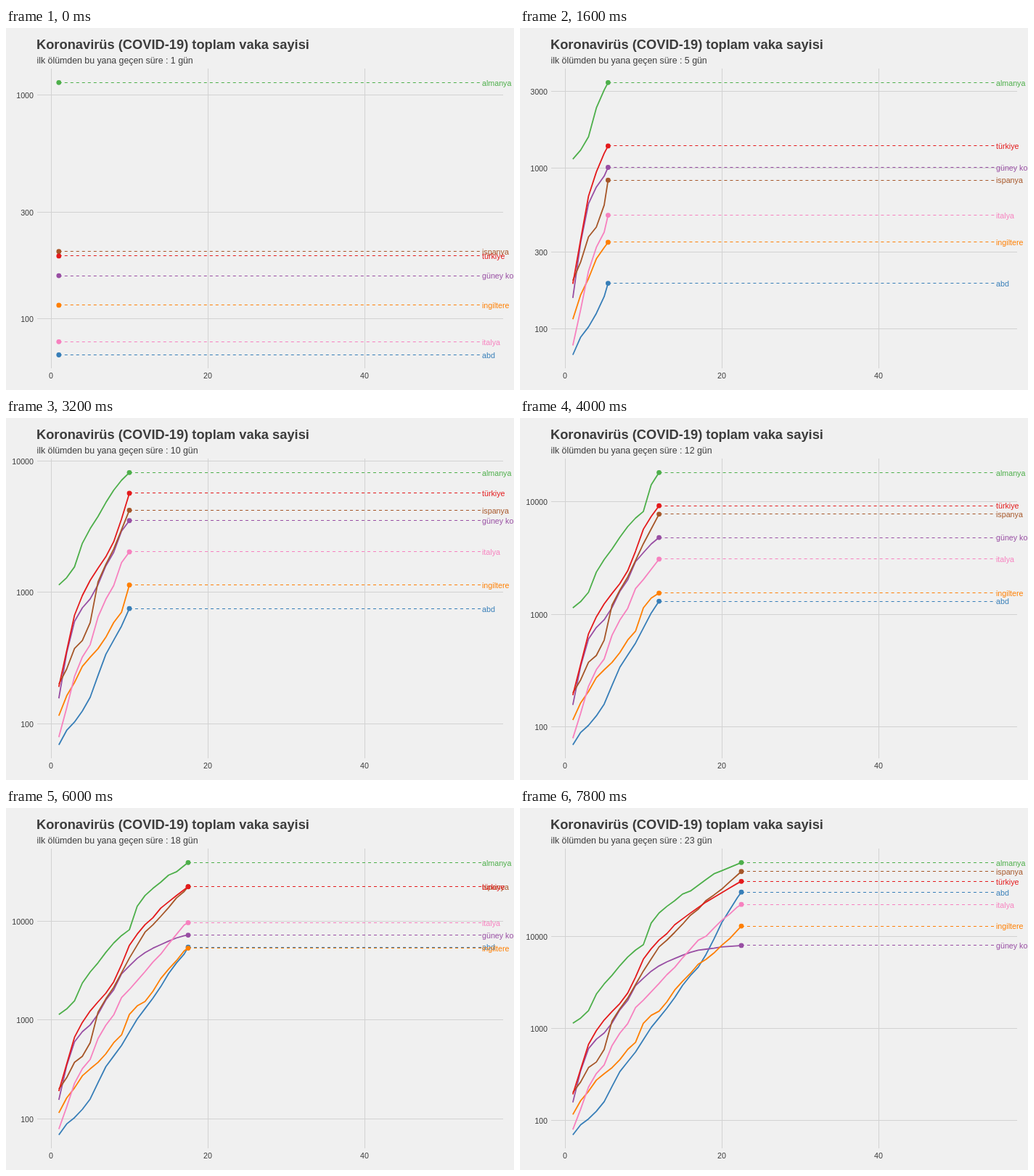
Animation of 700x500 px, one loop 8000 ms. Source, as an HTML page with a canvas:

```html
<!DOCTYPE html>
<html lang="tr">
<head>
<meta charset="utf-8">
<title>Koronavirüs (COVID-19) toplam vaka sayisi</title>
<style>
  html, body { margin: 0; width: 100%; height: 100%; overflow: hidden; background: #f0f0f0; }
  canvas { display: block; }
</style>
</head>
<body>
<canvas id="chart" width="700" height="500"></canvas>
<script>
const ctx = document.getElementById('chart').getContext('2d');
const FONT = '"Liberation Sans", Arial, sans-serif';
const INK = '#3c3c3c';
const STEP_MS = 200, STEPS = 40, STEPS_PER_DAY = 1.8;
const panel = { left: 43, right: 685, top: 56, bottom: 470 };
const yHigh = 75.3, yLow = 451.5;

// Daily totals; gaps are filled by the geometric mean of their neighbours.
const series = [
  ['abd', '#377eb8', [69, 89, 103, 125, 159, 233, 338, , 554, 754, 1025, , 1663, 2174, 2951, 3774, 4661, 6427, 9415, 14250, , 26747, 35206]],
  ['almanya', '#4daf4a', [1139, 1296, 1567, 2369, 3062, 3795, 4838, 6012, 7156, 8198, 14138, 18187, 21463, 24774, 29212, 31554, 36508, , 48582, 52547, , 61913, 67366]],
  ['güney kore', '#984ea3', [156, 346, 602, 763, 893, 1146, 1595, 2022, 2931, 3526, 4212, 4812, 5328, , 6284, 6767, 7134, , 7513, 7755, 7869, , 8086]],
  ['ingiltere', '#ff7f00', [115, 163, 206, 273, 321, 373, 456, 590, 707, 1140, 1391, 1543, 1950, 2626, 3269, 3983, 5018, 5683, 6650, 8077, 9529, , 14543]],
  ['ispanya', '#a65628', [200, 261, 374, 430, 589, 1204, 1639, 2140, 3004, 4231, , 7753, 9191, 11178, 13716, 17147, 19980, 24926, 28572, 33089, 39673, , 56188]],
  ['italya', '#f781bf', [79, 132, 229, 322, 400, 650, 888, 1128, 1689, 2036, , 3089, 3858, 4636, 5883, , 9172, 10149, 12462, 15113, 17660, 21157, 23980]],
  ['türkiye', '#e41a1c', [191, 359, 670, 947, 1236, 1529, 1872, 2433, 3629, 5698, 7402, 9217, 10827, 13531, 15679, 18135, , 23934, , 30217, , 38226, 42282]]
].map(([name, color, totals]) => ({
  name, color,
  logs: Array.from(totals, (v, i) => Math.log10(v || Math.sqrt(totals[i - 1] * totals[i + 1])))
}));

const xOf = day => 62 + day * 10.8;
const crisp = v => Math.floor(v) + 0.5;
const stepOfDay = day => Math.round((day - 1) * STEPS_PER_DAY);

// Each day lands on a whole step; the steps between interpolate.
function dayAt(step) {
  let day = 1;
  while (stepOfDay(day + 1) <= step) day++;
  const start = stepOfDay(day);
  return day + (step - start) / (stepOfDay(day + 1) - start);
}

function logAt(logs, day) {
  const i = Math.floor(day) - 1, part = day - 1 - i;
  return part ? logs[i] + (logs[i + 1] - logs[i]) * part : logs[i];
}

function text(str, x, y, size, color = INK, align = 'left', weight = '') {
  ctx.font = `${weight} ${size}px ${FONT}`;
  ctx.fillStyle = color;
  ctx.textAlign = align;
  ctx.fillText(str, x, y);
}

function line(points, color, width, dash = []) {
  ctx.strokeStyle = color;
  ctx.lineWidth = width;
  ctx.setLineDash(dash);
  ctx.beginPath();
  points.forEach(([x, y]) => ctx.lineTo(x, y));
  ctx.stroke();
}

function drawGrid(yOf) {
  const wide = yOf(4) >= panel.top;
  const breaks = wide ? [100, 1000, 10000] : [100, 300, 1000, 3000];
  for (const value of breaks) {
    const y = crisp(yOf(Math.log10(value)));
    if (y < panel.top) continue;
    line([[panel.left, y], [panel.right, y]], '#d2d2d2', 1);
    text(value, 38, Math.floor(y) + 5, 10.7, INK, 'right');
  }
  for (const day of [0, 20, 40]) {
    const x = crisp(xOf(day));
    line([[x, panel.top], [x, panel.bottom]], '#d2d2d2', 1);
    text(day, x - 0.5, 484, 10.7, INK, 'center');
  }
}

function draw(step) {
  const day = dayAt(step), x = xOf(day);
  const now = series.map(s => logAt(s.logs, day));
  const min = series[0].logs[0], max = Math.max(...now);
  const yOf = log => yLow - (log - min) / (max - min) * (yLow - yHigh);

  ctx.fillStyle = '#f0f0f0';
  ctx.fillRect(0, 0, 700, 500);
  drawGrid(yOf);
  text('Koronavirüs (COVID-19) toplam vaka sayisi', 42, 29, 18.3, INK, 'left', 'bold');
  text(`ilk ölümden bu yana geçen süre : ${Math.round(1 + step / STEPS_PER_DAY)} gün`, 42.5, 49, 12.33);

  ctx.lineJoin = 'round';
  series.forEach((s, i) => {
    const path = s.logs.slice(0, Math.floor(day)).map((log, d) => [xOf(d + 1), yOf(log)]);
    line([...path, [x, yOf(now[i])]], s.color, 1.8);
  });
  series.forEach((s, i) => {
    const y = crisp(yOf(now[i]));
    line([[x, y], [xOf(55), y]], s.color, 1, [4, 4]);
  });
  series.forEach((s, i) => {
    ctx.fillStyle = s.color;
    ctx.beginPath();
    ctx.arc(x, yOf(now[i]), 3.4, 0, Math.PI * 2);
    ctx.fill();
  });
  series.forEach((s, i) => text(s.name, 656, Math.round(yOf(now[i]) + 4.3), 10.7, s.color));
}

function tick() {
  draw(Math.floor(performance.now() / STEP_MS) % STEPS);
  requestAnimationFrame(tick);
}
tick();
</script>
</body>
</html>
```
